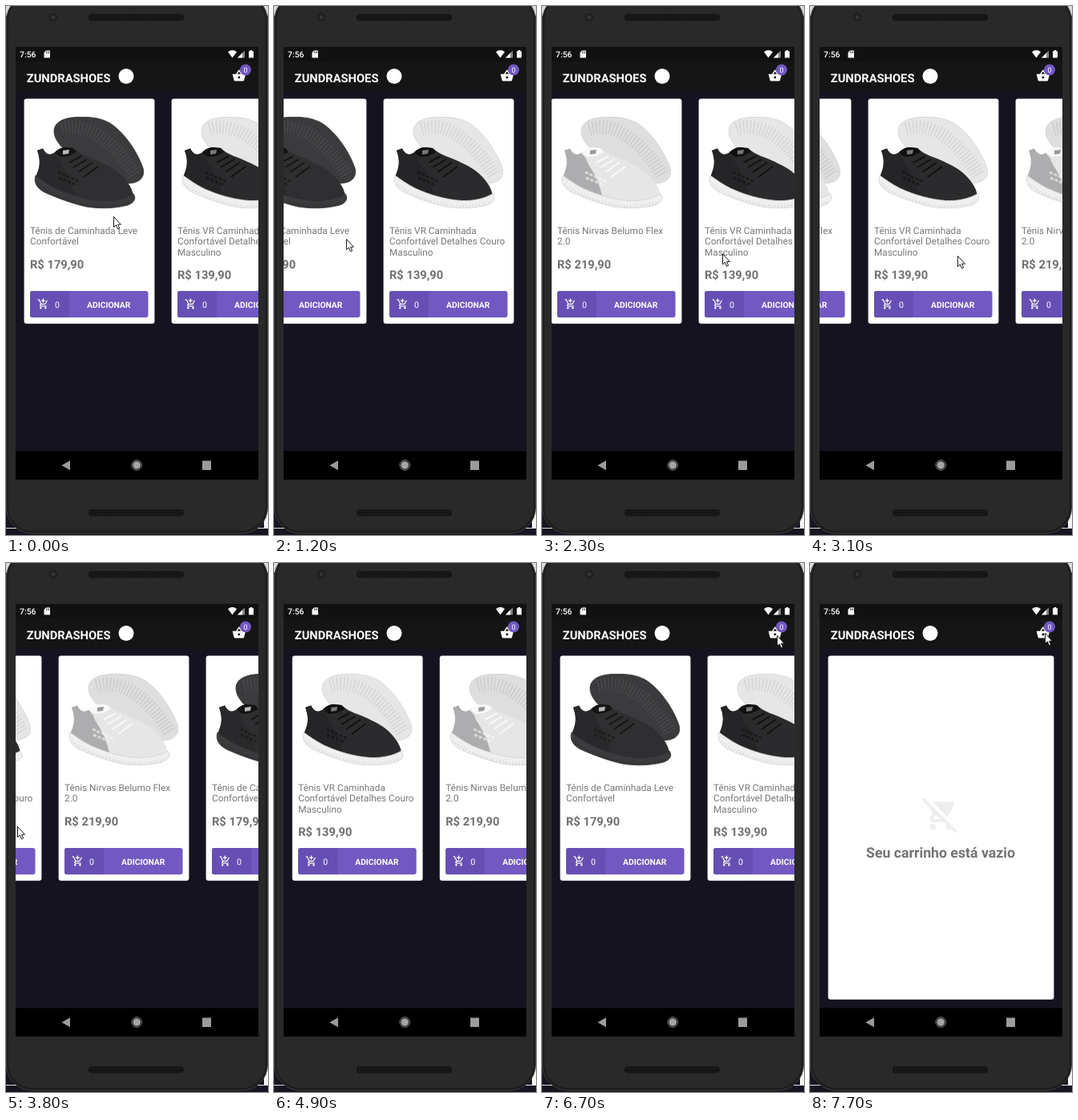
These frames come from a looping animation (327x659 px, 8 s). An HTML page:

```html
<!DOCTYPE html>
<html lang="pt-BR">
<head>
<meta charset="utf-8">
<title>Loja de tênis</title>
<style>
html, body { margin: 0; width: 100%; height: 100%; overflow: hidden; background: #171521; }
svg { display: block; width: 327px; height: 659px; font-family: Roboto, "Open Sans", sans-serif; text-rendering: geometricPrecision; }
.bold { font-weight: 700; }
</style>
</head>
<body>
<svg id="stage" viewBox="0 0 327 659"></svg>
<script>
const LOOP = 8000, PITCH = 184, FIRST_X = 23, MAX_SCROLL = 801;

const icons = {
  basket: 'M17.21 9l-4.38-6.56c-.19-.28-.51-.42-.83-.42-.32 0-.64.14-.83.43L6.79 9H2c-.55 0-1 .45-1 1 0 .09.01.18.04.27l2.54 9.27c.23.84 1 1.46 1.92 1.46h13c.92 0 1.69-.62 1.93-1.46l2.54-9.27L23 10c0-.55-.45-1-1-1h-4.79zM9 9l3-4.4L15 9H9zm3 8c-1.1 0-2-.9-2-2s.9-2 2-2 2 .9 2 2-.9 2-2 2z',
  add: 'M11 9h2V6h3V4h-3V1h-2v3H8v2h3v3zm-4 9c-1.1 0-1.99.9-1.99 2S5.9 22 7 22s2-.9 2-2-.9-2-2-2zm10 0c-1.1 0-1.99.9-1.99 2s.89 2 1.99 2 2-.9 2-2-.9-2-2-2zm-9.83-3.25l.03-.12.9-1.63h7.45c.75 0 1.41-.41 1.75-1.03l3.86-7.01L19.42 4h-.01l-1.1 2-2.76 5H8.53l-.13-.27L6.16 6l-.95-2-.94-2H1v2h2l3.6 7.59-1.35 2.45c-.16.28-.25.61-.25.96 0 1.1.9 2 2 2h12v-2H7.42c-.13 0-.25-.11-.25-.25z',
  empty: 'M22.73 22.73L2.77 2.77 2 2l-.73-.73L0 2.54l4.39 4.39 2.21 4.66-1.35 2.45c-.16.28-.25.61-.25.96 0 1.1.9 2 2 2h7.46l1.38 1.38c-.5.36-.83.95-.83 1.62 0 1.1.89 2 1.99 2 .67 0 1.26-.33 1.62-.84L21.46 24l1.27-1.27zM7.42 15c-.14 0-.25-.11-.25-.25l.03-.12.9-1.63h2.36l2 2H7.42zm8.13-2c.75 0 1.41-.41 1.75-1.03l3.58-6.49c.08-.14.12-.31.12-.48 0-.55-.45-1-1-1H6.54l9.01 9zM7 18c-1.1 0-1.99.9-1.99 2S5.9 22 7 22s2-.9 2-2-.9-2-2-2z'
};

const products = {
  black: { lines: ['Tênis de Caminhada Leve', 'Confortável'], price: 'R$ 179,90',
    upper: '#2f2f31', heel: '#29292b', sole: '#3b3b3e', edge: '#2c2c2e', back: '#3b3b3d', tread: '#4b4b4e', lace: '#141415', tag: '#bbb' },
  mixed: { lines: ['Tênis VR Caminhada', 'Confortável Detalhes Couro', 'Masculino'], price: 'R$ 139,90',
    upper: '#2b2b2d', heel: '#252527', sole: '#efefef', edge: '#d4d4d4', back: '#e6e6e6', tread: '#d2d2d2', lace: '#101011', tag: '#777' },
  white: { lines: ['Tênis Nirvas Belumo Flex', '2.0'], price: 'R$ 219,90',
    upper: '#e6e6e7', heel: '#adadaf', sole: '#efefef', edge: '#d0d0d2', back: '#dedede', tread: '#c8c8ca', lace: '#f9f9f9', tag: '#999' }
};
const order = ['black', 'mixed', 'white', 'mixed', 'white', 'black'];

const rect = (x, y, w, h, fill, more = '') => `<rect x="${x}" y="${y}" width="${w}" height="${h}" fill="${fill}" ${more}/>`;
const dot = (x, y, r, fill, more = '') => `<circle cx="${x}" cy="${y}" r="${r}" fill="${fill}" ${more}/>`;
const path = (d, fill, more = '') => `<path d="${d}" fill="${fill}" ${more}/>`;
const line = (d, color, w, more = '') => path(d, 'none', `stroke="${color}" stroke-width="${w}" ${more}`);
const text = (s, x, y, size, fill, more = '') => `<text x="${x}" y="${y}" font-size="${size}" fill="${fill}" ${more}>${s}</text>`;
const icon = (name, x, y, size, fill) => path(icons[name], fill, `transform="translate(${x} ${y}) scale(${size / 24})"`);

const shoe = p => `<g transform="translate(-23 -116)">` +
  path('M60 156C60 143 76 138 93 138.5C108 138 118 140 128 145C146 155 164 181 171 202C174 214 166 221 151 221C128 214 105 200 85 188C70 178 60 167 60 156Z', p.back, `stroke="${p.edge}" stroke-width=".8"`) +
  line('M70 153C104 143 138 172 161 211', p.tread, 17, 'stroke-dasharray="1.2 3"') +
  path('M39 180L46 177.5C49 184 54 187 60 183C64 179 68 176.5 74 176L84 177L89 181C96 186 104 188 113 192C124 197 133 201 141 208C150 216 157 225 159 236L150 243L110 243C78 238 52 226 37 213C42 202 44 194 39 180Z', p.upper) +
  path('M39 180L46 177.5C49 184 54 187 60 183L66 190C68 200 79 206 86 236C64 231 48 223 37 213C42 202 44 194 39 180Z', p.heel) +
  path('M61 183C65 178 69 176.5 74 176L84 177L88 182L78 187L68 188Z', p.lace) + path('M71 180L79 179L78 184L71 185Z', p.tag) +
  line('M79 195L94 187M84 201L101 191M90 207L108 195M97 213L115 200', p.lace, 2) +
  line('M65 207L92 219M66 214L88 223', p.lace, 3, 'opacity=".6" stroke-dasharray="4 2"') +
  path('M37 211C44 216 52 222 62 227C82 236 100 241 120 242.5C136 243 148 240 159 234C163 240 160 245 152 248C138 252 118 253 100 250C82 246 64 239 50 233C39 228 34 220 37 211Z', p.sole, `stroke="${p.edge}" stroke-width=".8"`) +
  line('M39 222C52 233 78 244 103 248C122 251 142 249 157 244', p.edge, 3, 'stroke-dasharray="1 3"') + '</g>';

const card = (p, i) => `<g transform="translate(${FIRST_X + i * PITCH} 116)">` +
  rect(-.4, -.4, 162.8, 280.2, '#fff', 'rx="3"') + shoe(p) +
  p.lines.map((s, n) => text(s, 7, 167.6 + n * 13.8, 11.8, '#777')).join('') +
  text(p.price, 7, 183 + p.lines.length * 13.8, 14.7, '#707070', 'class="bold"') +
  rect(7, 239, 147.5, 33, '#7159c1', 'rx="3"') +
  path('M10 239H56V272H10A3 3 0 0 1 7 269V242A3 3 0 0 1 10 239Z', '#664fb4') +
  icon('add', 16, 248, 14.7, '#fff') + text('0', 38, 260, 10.6, '#fff') +
  text('ADICIONAR', 105.2, 260, 10.3, '#fff', 'class="bold" text-anchor="middle"') + '</g>';

const speaker = y => rect(103, y, 119, 8.5, '#151515', 'rx="4"') +
  line(`M106 ${y + 2.5}H219M106 ${y + 6}H219`, '#242424', 1, 'stroke-dasharray="1 2"');

const phone =
  rect(0, 0, 327, 659, '#171521') + rect(0, 0, 327, 12, '#d8d8d8') +
  rect(322, 592, 5, 58, '#f4f4f4') + rect(0, 650, 327, 1, '#ddd') +
  rect(.5, -14, 326, 671, '#1c1c1c', 'rx="32" stroke="#3f3f3f"') + rect(3, -12, 321, 666, '#292929', 'rx="30"') +
  dot(59, 14, 5.5, '#1f1f1f') + dot(59, 14, 2.5, '#34343a') + speaker(10) + speaker(627) +
  rect(12, 51, 303, 539, '#15131f') + rect(12, 51, 303, 56, '#151515') + rect(12, 51, 303, 18, '#111');

const statusBar = text('7:56', 17, 63.7, 10.4, '#fff', 'font-weight="500"') +
  path('M50 55.5H55V64.5H47.5V58Z', '#fff') + line('M50.5 56.5V59M52.2 56.5V59M53.8 56.5V59', '#111', .7) +
  path('M277 57.2Q282.5 53 288 57.2L282.5 64.5Z', '#fff') +
  path('M298 55.5V64.5H289Z', '#888') + path('M295 58.5V64.5H289Z', '#fff') +
  path('M303 56.3H304.8V55H307.2V56.3H309V64.5H303Z', '#fff');

const header = text('ZUNDRASHOES', 25.8, 95.4, 14.7, '#fff', 'class="bold"') + dot(150, 87.5, 9.5, '#fff') +
  `<g id="basket">${icon('basket', 282, 78, 17.7, '#fff')}${dot(299, 79.5, 7, '#7159c1')}` +
  text('0', 299, 82.8, 9, '#fff', 'text-anchor="middle"') + '</g>';

const navBar = rect(12, 554.5, 303, 35.5, '#000') + path('M80 566.2V578.2L69.4 572.2Z', '#9b9b9b') +
  dot(163.2, 572, 6.2, 'none', 'stroke="#8a8a8a"') + dot(163.2, 572, 4.8, '#a5a5a5') + rect(245, 566.5, 11, 11.5, '#9b9b9b');

document.getElementById('stage').innerHTML =
  `<defs><clipPath id="view">${rect(12, 105, 303, 449.5, '#fff')}</clipPath></defs>` + phone +
  `<g clip-path="url(#view)"><g id="list">${order.map((k, i) => card(products[k], i)).join('')}</g>` +
  path('M12 105Q54 256 12 407Z', '#fff', 'id="glowL"') + path('M315 105Q273 256 315 407Z', '#fff', 'id="glowR"') +
  `<g id="cart">${rect(12, 107, 303, 448, '#15131f')}${rect(22.6, 115.6, 281.8, 428.2, '#fff', 'rx="3"')}` +
  icon('empty', 139.5, 289.5, 47, '#eee') +
  text('Seu carrinho está vazio', 163, 367, 17.7, '#737373', 'class="bold" text-anchor="middle"') + '</g></g>' +
  statusBar + header + navBar +
  path('M.5.5V13.6L3.4 10.9 5.4 15.8 7.6 14.9 5.6 10.2H9.4Z', '#fff', 'id="cursor" stroke="#000" stroke-width=".9"');

// time, scroll, cursor x, cursor y, edge glow
const keys = [
  [0, 0, 134, 262, 0], [900, 0, 160, 271, 0], [1200, 70, 90, 290, 0], [1600, 187, 119, 305, 0],
  [1800, 187, 186, 306, 0], [2000, 187, 261, 303, 0], [2100, 187, 261, 303, 0], [2400, 475, 207, 311, 0],
  [3000, 475, 207, 311, 0], [3100, 502, 184, 311, 0], [3800, 693, 14, 328, 0], [3900, 722, 13, 328, 0],
  [4000, MAX_SCROLL, 40, 320, .14], [4200, MAX_SCROLL, 74, 299, 0], [4300, MAX_SCROLL, 74, 299, 0],
  [4500, MAX_SCROLL, 84, 318, 0], [4700, 690, 196, 318, 0], [4900, 551.8, 340, 318, 0],
  [5300, 140, 340, 318, 0], [5500, 0, 60, 310, .1], [6000, 0, 180, 310, .14], [6200, 0, 213, 300, .07],
  [6400, 0, 303, 162, 0], [6600, 0, 300, 110, 0], [6700, 0, 293, 90, 0], [6900, 0, 293, 90, 0],
  [7000, 0, 293, 87, 0], [LOOP, 0, 293, 87, 0]
];

function tick(t) {
  const slow = t >= 4500 && t < 5500 ? 4500 : t >= 6000 && t < 6600 ? 6000 : -1;
  return slow < 0 ? Math.floor(t / 100) * 100 : slow + Math.floor((t - slow) / 200) * 200;
}

function pose(t) {
  const i = keys.findIndex(k => k[0] > t), a = keys[i - 1], b = keys[i];
  const f = (t - a[0]) / (b[0] - a[0]);
  return a.map((v, n) => v + (b[n] - v) * f);
}

const [list, cart, basket, cursor, glowL, glowR] =
  ['list', 'cart', 'basket', 'cursor', 'glowL', 'glowR'].map(id => document.getElementById(id));
const move = (el, x, y) => el.setAttribute('transform', `translate(${x} ${y})`);
const fade = (el, v) => el.setAttribute('opacity', v);

function draw(now) {
  const t = tick(now % LOOP), [, scroll, x, y, glow] = pose(t);
  move(list, -scroll, 0);
  move(cursor, x, y);
  fade(glowL, scroll < 400 ? glow : 0);
  fade(glowR, scroll > 400 ? glow : 0);
  fade(basket, t >= 7300 && t < 7500 ? .4 : 1);
  fade(cart, t < 7500 ? 0 : t < 7700 ? .6 : 1);
}

const start = performance.now();
function frame() {
  draw(performance.now() - start);
  requestAnimationFrame(frame);
}
frame();
</script>
</body>
</html>
```
